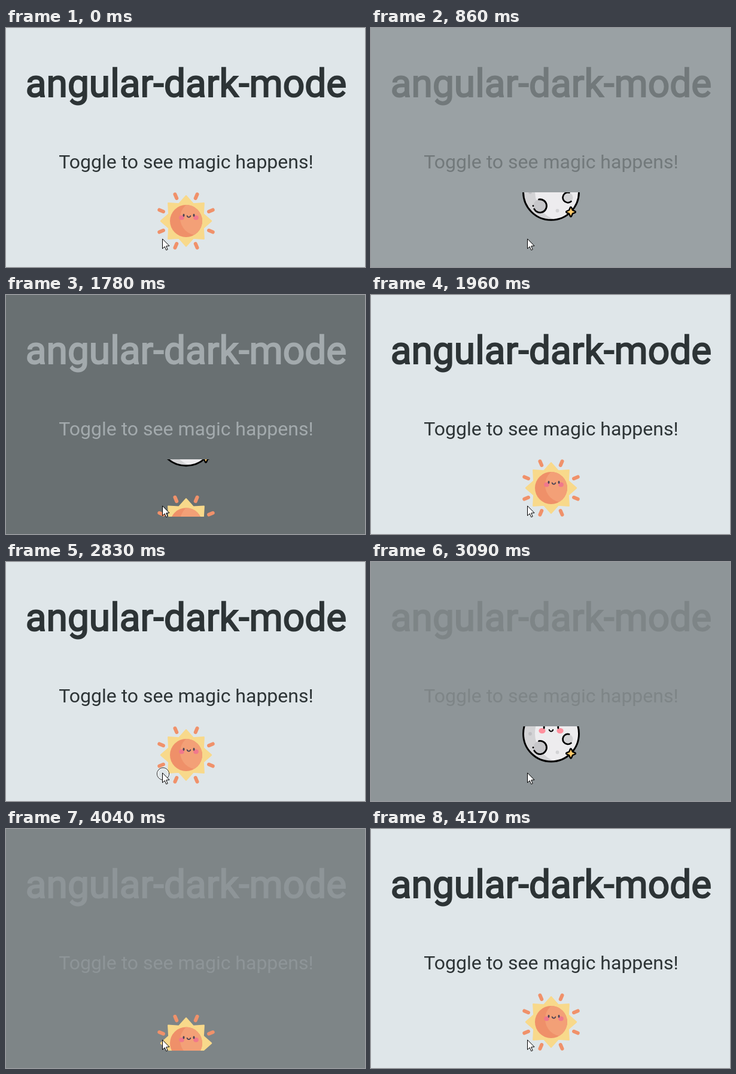
Animation, 600 px wide and 400 px high, one loop 4920 ms. Source, as an HTML page with a canvas:

```html
<!DOCTYPE html>
<html lang="en">
<head>
<meta charset="utf-8">
<title>angular-dark-mode</title>
<style>
  html, body { margin: 0; width: 100%; height: 100%; overflow: hidden; }
  body { position: relative; background: #dfe6e9; color: #2d3436; }
  h1, p {
    position: absolute; left: 1px; width: 600px; margin: 0;
    text-align: center; white-space: nowrap;
    font-family: Roboto, Arial, sans-serif; font-weight: 400;
  }
  h1 { top: 56px; font-size: 64px; line-height: 75px; -webkit-text-stroke: 2px currentColor; }
  p { top: 205px; font-size: 32px; line-height: 38px; }
  canvas { position: absolute; left: 0; top: 0; }
</style>
</head>
<body>
<h1>angular-dark-mode</h1>
<p>Toggle to see magic happens!</p>
<canvas id="stage" width="600" height="400"></canvas>
<script>
const ctx = document.getElementById('stage').getContext('2d');
const LOOP = 4920, FADE = 250, TRAVEL = 144;
const LIGHT = [223, 230, 233], DARK = [45, 52, 54];
const TAU = Math.PI * 2;

// press: button down; start: fade begins; first/step: screen refreshes; end: settled
const toggles = [
  { press: 660,  start: 763,  first: 780,  step: 80 / 3,  end: 1020 },
  { press: 1610, start: 1696, first: 1703, step: 25.7,    end: 1960 },
  { press: 2830, start: 2973, first: 2980, step: 80 / 3,  end: 3220 },
  { press: 3780, start: 3923, first: 3930, step: 80 / 3,  end: 4170 }
];

// CSS "ease": cubic-bezier(.25, .1, .25, 1)
function ease(x) {
  if (x <= 0 || x >= 1) return x <= 0 ? 0 : 1;
  const bez = (u, a, b) => 3 * u * (1 - u) * (1 - u) * a + 3 * u * u * (1 - u) * b + u * u * u;
  let lo = 0, hi = 1;
  for (let i = 0; i < 24; i++) {
    const mid = (lo + hi) / 2;
    if (bez(mid, .25, .25) < x) lo = mid; else hi = mid;
  }
  return bez(lo, .1, 1);
}

const mix = (a, b, k) => `rgb(${a.map((v, i) => Math.round(v + (b[i] - v) * k))})`;

function fill(color) { ctx.fillStyle = color; ctx.fill(); }

function stroke(color, width) {
  ctx.strokeStyle = color;
  ctx.lineWidth = width;
  ctx.stroke();
}

function oval(x, y, rx, ry = rx) {
  ctx.beginPath();
  ctx.ellipse(x, y, rx, ry, 0, 0, TAU);
}

function dot(x, y, color, rx, ry) { oval(x, y, rx, ry); fill(color); }

function arc(x, y, r, from, to, color, width) {
  ctx.beginPath();
  ctx.arc(x, y, r, from * Math.PI / 180, to * Math.PI / 180);
  stroke(color, width);
}

// A disc of one tone with a lighter disc laid over it
function shadedDisc(r, base, light, x, y, lr) {
  dot(0, 0, base, r);
  ctx.save();
  oval(0, 0, r);
  ctx.clip();
  dot(x, y, light, lr);
  ctx.restore();
}

function sun() {
  for (let i = 0; i < 8; i++) {
    const a = (i + .5) * TAU / 8, c = Math.cos(a), s = Math.sin(a);
    ctx.beginPath();
    ctx.moveTo(c * 41.2, s * 41.2);
    ctx.lineTo(c * 48.4, s * 48.4);
    stroke('#f0916a', 6);
  }
  ctx.beginPath();
  for (let i = 0; i < 16; i++) {
    const a = i * TAU / 16, r = i % 2 ? 31 : 42;
    ctx.lineTo(r * Math.cos(a), r * Math.sin(a));
  }
  ctx.closePath();
  fill('#f8d98b');
  stroke('#f8d98b', 2.4);
  shadedDisc(27, '#ef9069', '#f3a077', 19, -5, 29);
  for (const side of [-1, 1]) {
    dot(4.5 + side * 12, -5.7, '#f0788c', 4.3, 3.9);
    dot(4.5 + side * 8.5, -9.5, '#4a4355', 1.5, 2.4);
  }
  arc(4.5, -9.3, 2.9, 15, 165, '#4a4355', 1.9);
}

function sparkle(x, y, r, color, width) {
  const k = r * .3;
  ctx.beginPath();
  ctx.moveTo(x, y - r);
  for (let i = 0; i < 4; i++) {
    const a = i * TAU / 4, c = Math.cos(a), s = Math.sin(a);
    ctx.lineTo(x + k * (c + s), y + k * (s - c));
    ctx.lineTo(x + r * c, y + r * s);
  }
  ctx.closePath();
  stroke('#000', width * 2);
  fill(color);
}

function moon() {
  shadedDisc(46.6, '#d3d3d5', '#edecee', 23, -1, 50);
  dot(-35, 0, '#bfbfc2', 2.9);
  dot(22, -27, '#d3d3d5', 2.9);
  dot(10.5, 31, '#d3d3d5', 2.9);
  dot(-13, -25, '#d3d3d5', 6);
  dot(28, 9, '#d3d3d5', 8.5);
  dot(-18.5, 23, '#c6c6c9', 11);
  oval(0, 0, 46.5);
  stroke('#000', 2.9);
  arc(-13, -25, 5.8, -110, 150, '#000', 2.6);
  arc(28, 9, 8.5, 50, 285, '#000', 2.7);
  arc(-18.5, 23, 11, -100, 152, '#000', 2.8);
  dot(-30, 23, '#000', 1.4);
  for (const side of [-1, 1]) {
    dot(side * 15, -5, '#ff8f9d', 5.6, 4.5);
    dot(side * 11.8, -10.7, '#000', 1.5, 2.7);
  }
  arc(0, -7.2, 3.2, 10, 170, '#000', 2.2);
  sparkle(33, 33, 6.8, '#ffcb6b', 2.3);
  sparkle(-41, -41, 4.6, '#fbb870', 2);
}

function icon(draw, dy) {
  if (Math.abs(dy) >= 96) return;
  ctx.save();
  ctx.translate(301, 323 + dy);
  draw();
  ctx.restore();
}

function cursor(pressed) {
  if (pressed) {
    oval(262.5, 354.5, 10);
    stroke('#000', 1);
    oval(262.5, 354.5, 9);
    stroke('#fff', 1.1);
  }
  ctx.save();
  ctx.translate(261.5, 353.3);
  ctx.lineJoin = 'miter';
  ctx.beginPath();
  ctx.moveTo(0, 0);
  for (const [x, y] of [[0, 16], [3.7, 12.6], [6.2, 18.4], [8.7, 17.4], [6.2, 11.7], [11.2, 11.4]]) ctx.lineTo(x, y);
  ctx.closePath();
  fill('#fff');
  stroke('#000', 1);
  ctx.restore();
}

function stateAt(t) {
  let dark = false, p = 1, pressed = false;
  for (const g of toggles) {
    if (t >= g.press && t < g.first) pressed = true;
    if (t < g.first) break;
    dark = !dark;
    const shown = g.first + Math.floor((t - g.first + .5) / g.step) * g.step;
    p = t >= g.end ? 1 : Math.min(1, (shown - g.start) / FADE);
  }
  return { dark, p, pressed };
}

function render(t) {
  const { dark, p, pressed } = stateAt(t);
  const night = dark ? p : 1 - p;
  document.body.style.backgroundColor = mix(LIGHT, DARK, night);
  document.body.style.color = mix(DARK, LIGHT, night);

  const e = ease(p), shift = dark ? e : 1 - e;
  ctx.clearRect(0, 0, 600, 400);
  ctx.lineCap = ctx.lineJoin = 'round';
  ctx.save();
  ctx.beginPath();
  ctx.rect(253, 275, 96, 96);
  ctx.clip();
  icon(sun, shift * TRAVEL);
  icon(moon, (shift - 1) * TRAVEL);
  ctx.restore();
  cursor(pressed);
}

const t0 = performance.now();
function tick() {
  render((performance.now() - t0) % LOOP);
  requestAnimationFrame(tick);
}
tick();
</script>
</body>
</html>
```
